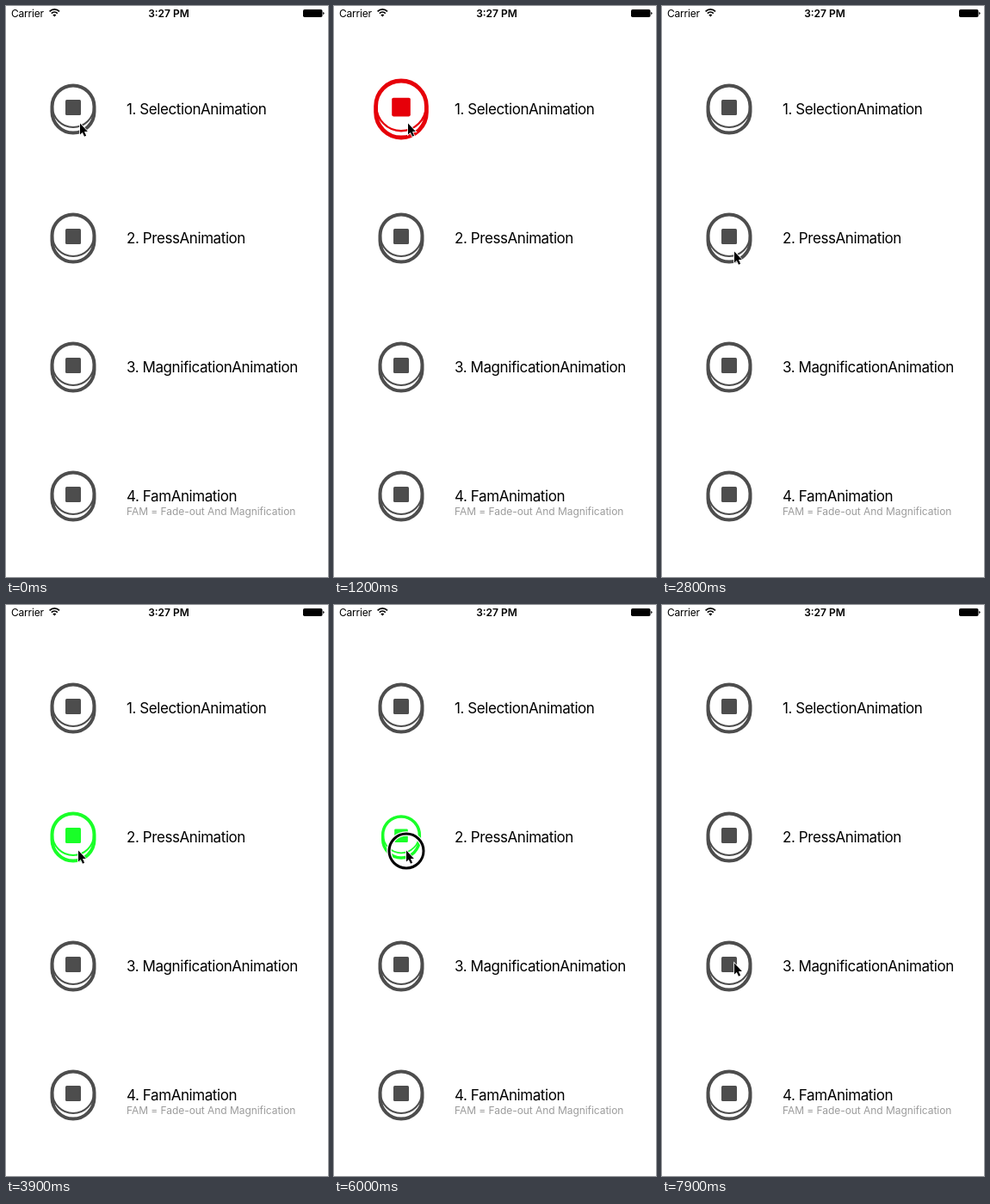
These frames come from a looping animation (374 px wide and 664 px high, 8000 ms). An HTML page:

```html
<!DOCTYPE html>
<html lang="en">
<head>
<meta charset="utf-8">
<title>Button animations</title>
<style>
  html, body { margin: 0; width: 100%; height: 100%; overflow: hidden; background: #fff; }
  svg { display: block; width: 374px; height: 664px; }
  text { font-family: Inter, Roboto, sans-serif; }
  .label { font-size: 17px; letter-spacing: -.42px; }
  .note { font-size: 12px; letter-spacing: -.05px; fill: #9c9c9c; }
  .status { font-size: 12px; letter-spacing: -.2px; }
  .clock { font-weight: 600; letter-spacing: 0; }
</style>
</head>
<body>
<svg viewBox="0 0 374 664">
  <defs>
    <g id="icon" fill="none" stroke="currentColor">
      <path d="M-24.5 -3a24.5 24.5 0 0 1 49 0v6a24.5 24.5 0 0 1 -49 0z" stroke-width="4"/>
      <path d="M-24 -3a24 24 0 0 0 48 0" stroke-width="2"/>
      <rect x="-9" y="-11" width="18" height="18" rx="1.5" fill="currentColor" stroke="none"/>
    </g>
  </defs>

  <text class="status" x="6" y="12.5">Carrier</text>
  <g fill="none" stroke="#000" stroke-width="1.7">
    <path d="M50.6 6.3a8.1 8.1 0 0 1 11.4 0M52.8 8.6a5 5 0 0 1 7 0"/>
    <path d="M56.3 12.4l-2 -2a2.8 2.8 0 0 1 4 0z" fill="#000" stroke="none"/>
  </g>
  <text class="status clock" x="189" y="12.5" text-anchor="middle">3:27 PM</text>
  <rect x="345" y="4" width="22.5" height="9" rx="1.8"/>
  <path d="M368.2 7v3q1.4 -.4 1.4 -1.5t-1.4 -1.5"/>

  <g id="rows"></g>
  <text class="note" x="140" y="592">FAM = Fade-out And Magnification</text>

  <g id="cursor">
    <g id="ring" fill="none">
      <circle cx=".5" cy="1" r="20" stroke="#fff" stroke-width="5.5"/>
      <circle cx=".5" cy="1" r="20" stroke="#000" stroke-width="3"/>
    </g>
    <path d="M.5 .5V13.5l2.8 -2.6 2.2 4.8 2.1 -.9 -2.1 -4.7h3.9z" stroke="#fff" stroke-width="1.6" paint-order="stroke"/>
  </g>
</svg>
<script>
const LOOP = 8000, STEP = 100;
const GREY = '#4d4d4d', DARK = '#292929', RED = '#e60009', GREEN = '#19ff28';
const $ = id => document.getElementById(id);
const rowY = i => 120 + 150 * i;

const labels = ['SelectionAnimation', 'PressAnimation', 'MagnificationAnimation', 'FamAnimation'];
$('rows').innerHTML = labels.map((name, i) =>
  `<use href="#icon"/><text class="label" x="140" y="${rowY(i) + 6}">${i + 1}. ${name}</text>`
).join('');
const icons = document.querySelectorAll('#rows use');

function setIcon(i, scale = 1, colour = GREY) {
  icons[i].setAttribute('transform', `translate(78 ${rowY(i)}) scale(${scale})`);
  icons[i].setAttribute('color', colour);
}
labels.forEach((_, i) => setIcon(i));

// Eased progress from 0 to 1
function ease(t, from, length) {
  const p = Math.min(1, Math.max(0, (t - from) / length));
  return p * p * (3 - 2 * p);
}

// One swell from 0 to 1 and back
const swell = (t, from, length) =>
  t > from && t < from + length ? Math.sin(Math.PI * (t - from) / length) ** 2 : 0;

const taps = [{ down: 750, up: 950 }, { down: 1600, up: 1800 }];
const holds = [{ down: 3000, up: 3600 }, { down: 5800, up: 7200 }];
const HIGHLIGHT_DELAY = 300;

const within = (t, { down, up }) => t >= down && t < up;

// Each release toggles the selected state
function drawSelection(t) {
  const size = taps.reduce((s, tap) => s + .2 * swell(t, tap.up, 500), 1);
  const on = taps.filter(tap => t >= tap.up).length % 2;
  setIcon(0, size, on ? RED : GREY);
}

function drawPress(t) {
  const depth = holds.reduce((d, h) => d + ease(t, h.down, 200) - ease(t, h.up, 200), 0);
  const on = holds.filter(h => t >= h.up).length % 2;
  const lit = holds.some(h => within(t, { down: h.down + HIGHLIGHT_DELAY, up: h.up }));
  setIcon(1, 1 - .13 * depth, lit ? DARK : on ? GREEN : GREY);
}

function drawCursor(t) {
  const first = ease(t, 2400, 400), second = ease(t, 7400, 400);
  $('cursor').setAttribute('transform',
    `translate(${85.5 - 2 * first} ${136 + 149 * first + 131 * second})`);
  const down = [...taps, ...holds].some(p => within(t, p));
  $('ring').setAttribute('visibility', down ? 'visible' : 'hidden');
}

const start = performance.now();
function frame(now) {
  const elapsed = Math.max(0, now - start) % LOOP;
  const t = Math.floor(elapsed / STEP) * STEP;
  drawSelection(t);
  drawPress(t);
  drawCursor(t);
  requestAnimationFrame(frame);
}
frame(start);
</script>
</body>
</html>
```
